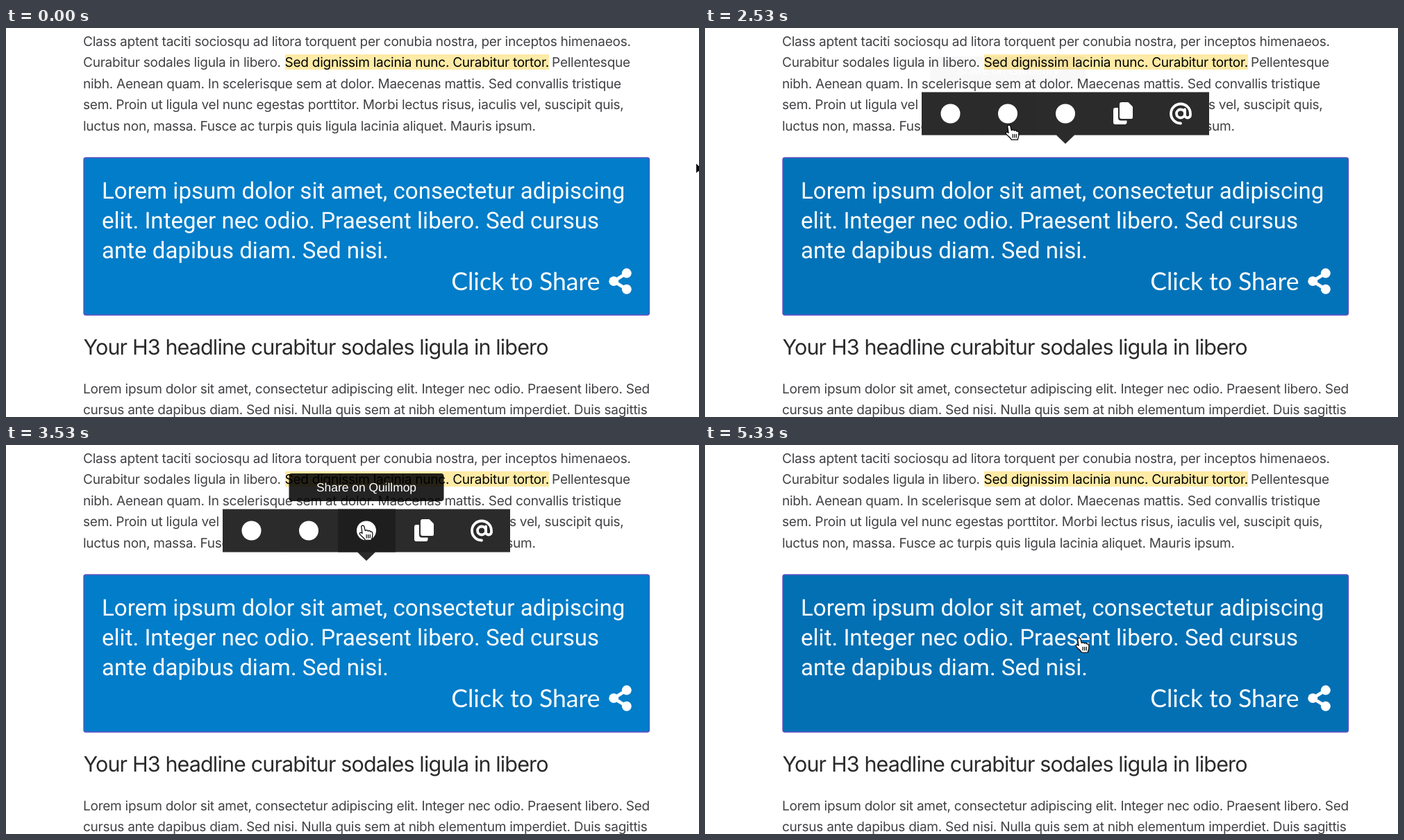
Animation, 998 px wide and 561 px high, one loop 6070 ms. Source, as an HTML page:

```html
<!DOCTYPE html>
<html lang="en">
<head>
<meta charset="utf-8">
<title>Click to Share</title>
<style>
  html, body { margin: 0; height: 100%; overflow: hidden; background: #fff; }
  svg { display: block; width: 100vw; height: 100vh; }
  text { white-space: pre; text-rendering: geometricPrecision; }
  .body, .head { font-family: Inter, sans-serif; font-optical-sizing: none; }
  .body { font-size: 19.06px; letter-spacing: -.265px; fill: #414145; }
  .head { font-size: 30.5px; letter-spacing: -.865px; fill: #2a2a2c; }
  .quote { font: 33.1px Roboto, sans-serif; fill: #fff; }
  .share { font: 35.6px Lato, sans-serif; fill: #fff; }
  .tip text { font: 17.4px "Liberation Sans", Arial, sans-serif; fill: #fff; text-anchor: middle; }
</style>
</head>
<body>
<svg viewBox="0 0 998 561">
  <g class="body">
    <rect x="402" y="38" width="380" height="22" fill="#feeba6"/>
    <text x="111" y="25.5">Class aptent taciti sociosqu ad litora torquent per conubia nostra, per inceptos himenaeos.</text>
    <text x="111" y="56">Curabitur sodales ligula in libero. <tspan x="401.5" fill="#000">Sed dignissim lacinia nunc. Curabitur tortor.</tspan><tspan x="781"> Pellentesque</tspan></text>
    <text x="111" y="86.5">nibh. Aenean quam. In scelerisque sem at dolor. Maecenas mattis. Sed convallis tristique</text>
    <text x="111" y="117">sem. Proin ut ligula vel nunc egestas porttitor. Morbi lectus risus, iaculis vel, suscipit quis,</text>
    <text x="111" y="147.5">luctus non, massa. Fusce ac turpis quis ligula lacinia aliquet. Mauris ipsum.</text>
    <text x="111" y="526.5">Lorem ipsum dolor sit amet, consectetur adipiscing elit. Integer nec odio. Praesent libero. Sed</text>
    <text x="111" y="557">cursus ante dapibus diam. Sed nisi. Nulla quis sem at nibh elementum imperdiet. Duis sagittis</text>
  </g>
  <text class="head" x="111.5" y="471">Your H3 headline curabitur sodales ligula in libero</text>

  <rect id="card" x="112" y="187" width="814.5" height="227" rx="3" stroke="#6450c4" stroke-width="1.4"/>
  <g class="quote">
    <text x="138" y="246.3">Lorem ipsum dolor sit amet, consectetur adipiscing</text>
    <text x="138" y="289.3">elit. Integer nec odio. Praesent libero. Sed cursus</text>
    <text x="138" y="332.3">ante dapibus diam. Sed nisi.</text>
  </g>
  <text class="share" x="641.2" y="378">Click to Share</text>
  <g transform="translate(868.3 346.6) scale(.0725)" fill="#fff">
    <path d="M352 96L96 256 352 416" fill="none" stroke="#fff" stroke-width="66"/>
    <circle cx="352" cy="96" r="96"/><circle cx="96" cy="256" r="96"/><circle cx="352" cy="416" r="96"/>
  </g>

  <g id="popup">
    <path d="M312 92.5H726V154.5H532L519 167 506 154.5H312Z" fill="#2b2b2b"/>
    <rect id="cellA" x="395" y="92.5" width="83" height="62" fill="#1e1e1e"/>
    <rect id="cellB" x="478" y="92.5" width="83" height="62" fill="#1e1e1e"/>
    <g fill="#fff">
      <circle cx="353.5" cy="123.5" r="14"/><circle cx="436" cy="123.5" r="14"/><circle cx="519" cy="123.5" r="14"/>
      <path d="M600 107h9.5l6.5 6.5V129a2 2 0 0 1-2 2h-14a3 3 0 0 1-3-3v-18a3 3 0 0 1 3-3z"/>
      <path d="M591 115h4v14.5a4 4 0 0 0 4 4h8.5v2.5a3 3 0 0 1-3 3H591a3 3 0 0 1-3-3v-18a3 3 0 0 1 3-3z"/>
    </g>
    <g transform="translate(685 123.5)" fill="none" stroke="#fff" stroke-width="3.8" stroke-linecap="round">
      <circle r="6"/>
      <path d="M6-6V2a4 4 0 0 0 8 0V0A14 14 0 1 0 0 14"/>
    </g>
    <g id="tipA" class="tip">
      <rect x="324" y="41" width="224" height="40" rx="4" fill-opacity=".92"/>
      <text x="436" y="67.3">Share on Gardenry</text>
    </g>
    <g id="tipB" class="tip">
      <rect x="407.5" y="41" width="223" height="40" rx="4" fill-opacity=".92"/>
      <text x="519" y="67.3">Share on Quillmop</text>
    </g>
  </g>

  <g id="cursor" stroke-linejoin="round" stroke-linecap="round">
    <path id="arrow" d="M0 0V16.5L3.8 13 6.4 19 9 17.9 6.5 12H11.5Z" stroke="#fff" stroke-width="1.2"/>
    <g id="hand" stroke="#000" stroke-width="1.3" transform="scale(.92)">
      <path fill="#fff" d="M-2.4 1.8C-3-1.2 1.2-2 2 .8L3.6 7.2C5 5.8 7.4 6.2 7.9 7.8 9.3 6.6 11.4 7.2 11.8 8.9 13.4 8.2 15 9.2 15 11V15C15 18 13.6 19.5 13.4 22H3.6C3 19.5-1.5 16.6-4.4 13.2-6.5 10.6-3.6 8.6-1 11.4Z"/>
      <path d="M5.6 13.5V18.5M8.4 13.5V18.5M11.2 13.5V18.5"/>
    </g>
  </g>
</svg>
<script>
const LOOP = 6070, STEP = 1000 / 15;
const $ = id => document.getElementById(id);
const show = (id, opacity) => $(id).setAttribute('opacity', opacity);
const ramp = (t, start, length) => Math.min(1, Math.max(0, (t - start) / length));
const mix = (a, b, k) => a.map((v, i) => Math.round(v + (b[i] - v) * k));

// Pointer path: time, x, y
const path = [
  [267, 993.5, 194], [933, 695, 271], [2200, 695, 271], [2533, 438, 141],
  [2867, 433, 115], [3100, 440, 113], [3267, 482, 113], [3533, 514, 117],
  [3800, 516, 119], [4200, 515, 133], [4400, 508, 148], [4667, 482, 217],
  [4867, 527, 266], [5067, 539, 279]
];

const slope = (i, axis) => {
  if (i < 0 || i >= path.length - 1) return 0;
  return (path[i + 1][axis] - path[i][axis]) / (path[i + 1][0] - path[i][0]);
};
const tangent = (i, axis) => {
  const a = slope(i - 1, axis), b = slope(i, axis);
  return a * b > 0 ? 2 * a * b / (a + b) : 0;
};

// Monotone cubic interpolation along the path
function pointer(t, axis) {
  const last = path.length - 1;
  if (t <= path[0][0]) return path[0][axis];
  if (t >= path[last][0]) return path[last][axis];
  const i = path.findIndex(p => p[0] > t) - 1;
  const span = path[i + 1][0] - path[i][0], u = (t - path[i][0]) / span;
  const s = u * u * (3 - 2 * u);
  return path[i][axis] * (1 - s) + path[i + 1][axis] * s
    + span * u * (1 - u) * (tangent(i, axis) * (1 - u) - tangent(i + 1, axis) * u);
}

function draw(t) {
  const x = pointer(t, 1), y = pointer(t, 2);
  const popupOpen = t > 1100 && t < 5330;
  const onCard = x > 111 && x < 927 && y > 186 && y < 415;
  const onPopup = popupOpen && x > 312 && x < 726 && y > 92 && y < 155;
  $('cursor').setAttribute('transform', `translate(${x} ${y})`);
  show('hand', onCard || onPopup ? 1 : 0);
  show('arrow', onCard || onPopup ? 0 : 1);

  const hover = ramp(t, 480, 300) - ramp(t, 2460, 300) + ramp(t, 4545, 300);
  $('card').setAttribute('fill', `rgb(${mix([2, 125, 201], [3, 112, 180], hover)})`);

  show('popup', popupOpen ? ramp(t, 1067, 200) : 0);
  show('cellA', ramp(t, 2525, 300) - ramp(t, 3255, 300));
  show('cellB', ramp(t, 3255, 300) - ramp(t, 4400, 300));
  show('tipA', t < 3260 ? ramp(t, 2525, 300) : 0);
  show('tipB', t < 4430 ? ramp(t, 3255, 300) : 0);
}

function tick() {
  const t = performance.now() % LOOP;
  draw(Math.floor((t + 4) / STEP) * STEP);
  requestAnimationFrame(tick);
}
tick();
</script>
</body>
</html>
```
